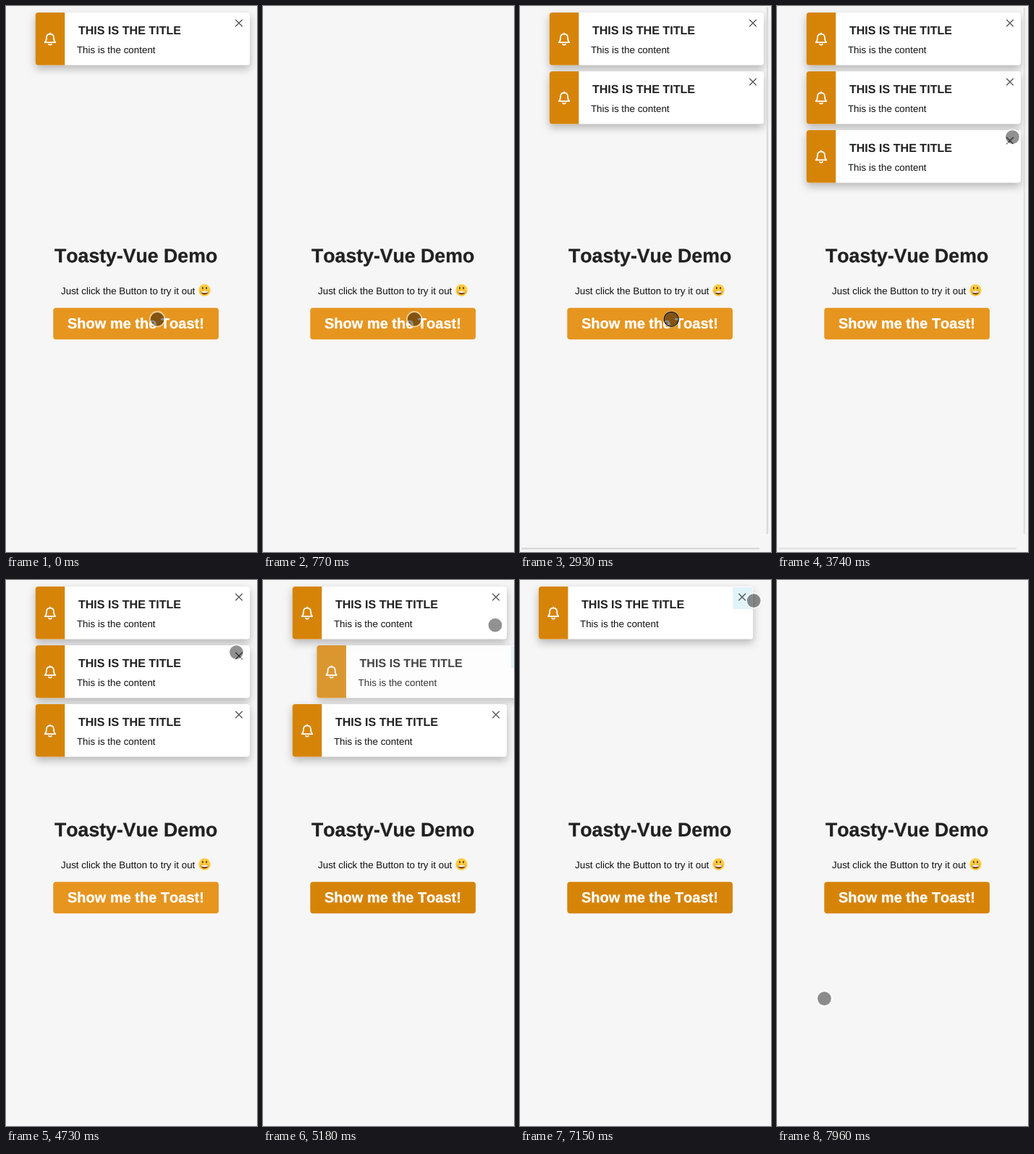
Animation of 347x752 px, one loop 8 s. Source, as an HTML page:

```html
<!DOCTYPE html>
<html lang="en">
<head>
<meta charset="utf-8">
<title>Toasty-Vue Demo</title>
<style>
  html, body { margin: 0; width: 100%; height: 100%; overflow: hidden; background: #f6f6f6; }
  svg { display: block; font-family: "Liberation Sans", Arial, sans-serif; }
  text { font-kerning: none; text-rendering: geometricPrecision; font-size: 13.4px; fill: #111; }
  .title { font-weight: bold; font-size: 16.1px; fill: #212121; }
  .heading { font-weight: bold; font-size: 26.67px; fill: #212121; stroke: #212121; stroke-width: .3; }
  .label { font-weight: bold; font-size: 20px; fill: #fff; stroke: #fff; stroke-width: .3; }
  .card { fill: #fff; filter: drop-shadow(0 5px 6px rgba(0, 0, 0, .26)); }
</style>
</head>
<body>
<svg width="347" height="752" viewBox="0 0 347 752">
  <defs>
    <g id="toast">
      <rect class="card" width="296.3" height="72.4" rx="4"/>
      <path d="M40.6 0H4Q0 0 0 4V68.4Q0 72.4 4 72.4H40.6Z" fill="#d68408"/>
      <g fill="none" stroke="#fff" stroke-width="1.7" stroke-linecap="round" stroke-linejoin="round">
        <path d="M13 41.2Q15.3 39 15.3 34.4C15.3 31.2 17.5 29.6 20.3 29.6S25.3 31.2 25.3 34.4Q25.3 39 27.6 41.2Z"/>
        <path d="M20.3 28.4V29.4M18.3 43.6Q20.3 45.5 22.3 43.6"/>
      </g>
      <text class="title" x="59.2" y="30">THIS IS THE TITLE</text>
      <text x="57.2" y="56">This is the content</text>
    </g>
    <path id="close" d="M276.5 9.7l9.6 9.6m0-9.6l-9.6 9.6" stroke="#555" stroke-width="1.3" fill="none"/>
  </defs>

  <text class="heading" x="179.6" y="353" text-anchor="middle">Toasty-Vue Demo</text>
  <text x="76" y="397">Just click the Button to try it out</text>
  <g transform="translate(274.5 391.5)">
    <circle r="8.2" fill="#fdcb3a"/>
    <ellipse cx="-2.6" cy="-3" rx="1" ry="1.7" fill="#6b431a"/>
    <ellipse cx="2.6" cy="-3" rx="1" ry="1.7" fill="#6b431a"/>
    <path d="M-5.4 .8Q0 2 5.4 .8Q4.8 6 0 6T-5.4 .8Z" fill="#85481c"/>
    <path d="M-5 1Q0 2 5 1L4.4 3Q0 3.8 -4.4 3Z" fill="#fff"/>
  </g>
  <rect id="button" x="65.3" y="415.8" width="228.7" height="43.4" rx="4"/>
  <text class="label" x="85" y="444">Show me the Toast!</text>

  <g id="toasts"></g>
  <g id="bars" stroke="#d9d9d9" stroke-width="2.5">
    <line id="barX" x1="2" y1="747.2" y2="747.2"/>
    <line id="barY" x1="342" x2="342" y1="2"/>
  </g>
  <g id="cursor">
    <circle r="9.5" fill-opacity=".43"/>
    <circle r="10.3" fill="none" stroke="#fff" stroke-opacity=".55" stroke-width="1.8"/>
    <circle id="press" r="10" fill="none" stroke="#111" stroke-width="1.3"/>
  </g>
</svg>
<script>
const LOOP = 8000, ENTER = 300, LEAVE = 290, PRESS = 180;
const byId = id => document.getElementById(id);
const set = (node, attrs) => { for (const key in attrs) node.setAttribute(key, attrs[key]); };
const show = (node, visible) => { node.style.display = visible ? "" : "none"; };
const clamp = v => Math.min(1, Math.max(0, v));
const mix = (a, b, p) => a + (b - a) * p;
const easeOut = p => 1 - (1 - p) ** 3;
const smooth = p => p * p * (3 - 2 * p);

// CSS "ease": cubic-bezier(.25, .1, .25, 1)
function ease(p) {
  let low = 0, high = 1;
  for (let i = 0; i < 20; i++) {
    const s = (low + high) / 2;
    if (.75 * s * (1 - s) + s ** 3 < p) low = s; else high = s;
  }
  return .3 * low * (1 - low) ** 2 + 3 * low * low * (1 - low) + low ** 3;
}

// Keyframes are [progress, x, opacity]; the easing applies to each segment
const bounceIn = [[0, 3000, 0], [.6, -24, 1], [.75, 10, 1], [.9, -5, 1], [1, 0, 1]];
const bounceOut = [[0, 0, 1], [.2, -20, 1], [1, 296, 0]];

function pose(keyframes, progress, easing) {
  const next = keyframes.findIndex(([at]) => at > progress);
  if (next < 0) return keyframes.at(-1).slice(1);
  const [from, ...a] = keyframes[next - 1], [to, ...b] = keyframes[next];
  const p = easing((progress - from) / (to - from));
  return a.map((value, i) => mix(value, b[i], p));
}

// The button is tapped three times, then the middle, first and last toast are closed
const addTaps = [0, 1, 2].map(i => 1850 + 540 * i);
const closeTaps = [4818, 5957, 6853];
const taps = [...addTaps, ...closeTaps];

const createToast = (enter, leave) => {
  const node = document.createElementNS("http://www.w3.org/2000/svg", "g");
  node.innerHTML = '<use href="#toast"/><rect x="268.5" y="1" width="27" height="30" fill="#e0f3f9"/><use href="#close"/>';
  byId("toasts").append(node);
  return { enter, leave, node, hover: node.children[1] };
};
const closeOrder = [1, 0, 2];
const toasts = [
  createToast(-ENTER, 474),
  ...addTaps.map((tap, i) => createToast(tap + PRESS + 4, closeTaps[closeOrder[i]] + PRESS + 92))
];

// Each cursor move: start, end, x, y
const home = [209.2, 431.3];
const moves = [
  [3470, 3740, 325.5, 180.5], [3740, 4100, 317, 77], [4100, 4370, 318.5, 99.5],
  [5000, 5350, 323.2, 28.5], [7540, 7960, 65.5, 576.5]
];
const cursorAt = t => moves.reduce(([x, y], [from, to, endX, endY]) => {
  const p = smooth(clamp((t - from) / (to - from)));
  return [mix(x, endX, p), mix(y, endY, p)];
}, home);

function drawToasts(t) {
  let slot = 0;
  for (const { enter, leave, node, hover } of toasts) {
    const alive = t >= enter && t < leave + LEAVE;
    show(node, alive);
    if (!alive) continue;
    const [x, opacity] = t < leave
      ? pose(bounceIn, (t - enter) / ENTER, easeOut)
      : pose(bounceOut, (t - leave) / LEAVE, ease);
    set(node, { transform: `translate(${40.7 + x} ${9 + 81 * slot++})`, opacity });
    show(hover, enter > 0 && t > leave - 70);
  }
}

function drawBars(t) {
  const latest = toasts.findLast(toast => t >= toast.enter).enter;
  const size = mix(.1, 1, smooth(clamp((t - latest) / 350)));
  set(byId("barX"), { x2: 2 + 329 * size });
  set(byId("barY"), { y2: 2 + 725 * size });
  set(byId("bars"), { opacity: latest > 0 ? 1 - clamp((t - 3400) / 1000) : 0 });
}

function draw(t) {
  drawToasts(t);
  drawBars(t);
  set(byId("button"), { fill: t < closeTaps[0] + PRESS ? "#e6951f" : "#d68408" });
  set(byId("cursor"), { transform: `translate(${cursorAt(t)})` });
  show(byId("press"), taps.some(tap => t >= tap && t < tap + PRESS));
}

const start = performance.now();
function frame() {
  draw((performance.now() - start) % LOOP);
  requestAnimationFrame(frame);
}
frame();
</script>
</body>
</html>
```
